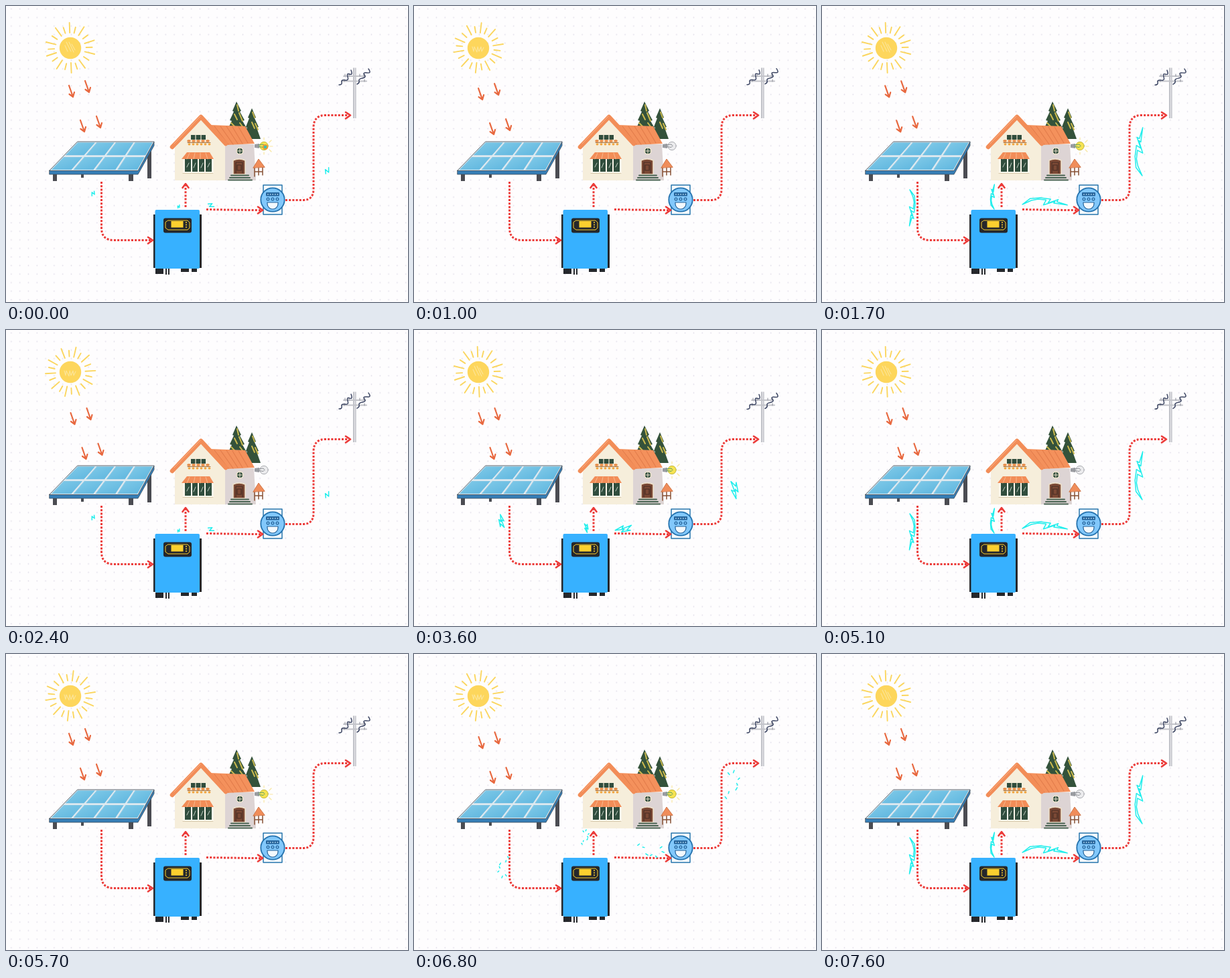
Write an HTML page that moves like this. It is 600x443 px and loops after 7.7 s.

```html
<!DOCTYPE html>
<html lang="en">
<head>
<meta charset="utf-8">
<title>Solar power flow</title>
<style>
html, body { margin: 0; width: 100%; height: 100%; overflow: hidden; background: #fefdfe; }
svg { display: block; width: 600px; height: 443px; fill: none; stroke-linecap: round; stroke-linejoin: round; }
.dots { stroke: #ec3b39; stroke-width: 3; stroke-linecap: butt; stroke-dasharray: 3 2.2; }
.tip { stroke: #ec3b39; stroke-width: 2.6; }
</style>
</head>
<body>
<svg viewBox="0 0 600 443">
  <defs>
    <pattern id="grid" width="12.8" height="12.8" patternUnits="userSpaceOnUse" x="1.5" y="-2">
      <circle cx="6.4" cy="6.4" r="0.9" fill="#e0dde8"/>
    </pattern>
    <linearGradient id="steel">
      <stop offset="0" stop-color="#a9abb3"/><stop offset=".5" stop-color="#e3e3e7"/><stop offset="1" stop-color="#b4b5bd"/>
    </linearGradient>
    <linearGradient id="glass" x2="1" y2="1">
      <stop offset="0" stop-color="#82cbe9"/><stop offset="1" stop-color="#5db5de"/>
    </linearGradient>
  </defs>
  <path fill="url(#grid)" d="M0 0H600V443H0z"/>

  <g transform="translate(96 63)">
    <circle r="16.2" fill="#fdd65c"/>
    <path id="scribble" stroke="#fce59a" stroke-width="1.1"/>
    <path id="rays" stroke="#fbd65f" stroke-width="1.9"/>
  </g>
  <path id="beams" stroke="#e8683f" stroke-width="2.2"/>

  <!-- solar panel -->
  <path fill="#4b4c52" d="M70 250h6v12h-6zM112 250h4v7h-4zM183 247h7v15h-7zM211 215h6v43h-6z"/>
  <path fill="#357db5" stroke="#42505c" stroke-width=".8" d="M65 246H197L221 203V209L197 252H65z"/>
  <path fill="#dfeaf0" stroke="#4d5962" stroke-width=".9" d="M107 203H221L197 246.500H65z"/>
  <g id="cells" fill="url(#glass)" stroke="#5cb3da" stroke-width=".5"></g>

  <!-- house -->
  <g fill="#34523b">
    <path d="M344 143l7 14-2 1 7 13-3 1 8 14-3 1 4 13H327l5-13-2-1 7-14-3-1 6-13-2-1z"/>
    <path d="M367 153l6 14-2 1 6 13-3 1 6 17H354l6-17-2-1 5-13-2-1z"/>
  </g>
  <path stroke="#c9b84e" stroke-width="2" d="M345 148l2 9M341 162l4 8M348 160l5 12M336 175l5 5M349 175l6 8M368 159l3 8M367 174l4 9M372 176l4 9"/>
  <path fill="#f6eedb" d="M252 261V208L291 169 328 208V261z"/>
  <path fill="#ddd4d4" d="M327 207H370L373 261H327z"/>
  <path fill="#f4915c" d="M304 178L357 180 371 206 329 208z"/>
  <path stroke="#e27c4b" stroke-width="1.1" d="M311 180l21 27M320 180l19 27M329 180l17 26M338 181l15 25M347 181l14 24"/>
  <path stroke="#f28d58" stroke-width="6.5" d="M248 211L291 166 328 206"/>
  <path stroke="#f9b28a" stroke-width="1" d="M251 206L290 165"/>
  <path fill="#304d3d" d="M276 193h22v7h-22z"/>
  <path stroke="#f3ead2" stroke-width="1.200" d="M283 193v7M291 193v7"/>
  <path stroke="#e68a45" stroke-width="3.500" stroke-dasharray="2 5" d="M272 202H306"/>
  <path stroke="#f1a53f" stroke-width="2.800" stroke-dasharray="1 5" d="M273 207H305"/>
  <path stroke="#a17143" stroke-width="1" d="M271 204.500H305"/>
  <path fill="#fbf6ea" d="M264 228h46v23h-46z"/>
  <path fill="#304d3d" d="M267 229h9v19h-9zM278 229h8v19h-8zM288 229h8v19h-8zM298 229h9v19h-9z"/>
  <path stroke="#c3cfc3" stroke-width="1" d="M270 241l3-6M280 242l3-7M291 242l3-7M301 241l3-6"/>
  <path stroke="#d7c8aa" stroke-width="1.200" d="M264 250.500H309"/>
  <path fill="#f28d58" d="M270 219h34l6 10h-48z"/>
  <path stroke="#f8b98d" stroke-width="1" d="M274 220l-4 9M282 220l-2 9M290 220v9M298 220l3 9"/>
  <circle cx="349" cy="217" r="5" fill="#304d3d" stroke="#efe4cf" stroke-width="1.400"/>
  <path stroke="#efe4cf" d="M349 212v10M344 217h10"/>
  <path fill="#7b4935" stroke="#f0e2cb" stroke-width="1.500" d="M339 252V231q9-4 18 0V252z"/>
  <path stroke="#492d24" stroke-width="1.200" d="M343 250V234h10v16M345 238h6v8h-6z"/>
  <path stroke="#496352" stroke-width="2" d="M336 253.500H362M334 257H364M332 260.500H367"/>
  <path stroke="#875035" stroke-width="1.500" d="M371 241V255M383 241V253M371 248H383M377 242V253"/>
  <path fill="#f08d5a" stroke="#cf7548" d="M369 242l8-13 9 12z"/>

  <g>
    <path id="glow" stroke="#f9e6a0" stroke-width="1.200" d="M385 200v-3M393 204l3-3M394 210h4M393 215l3 3M385 219v3"/>
    <path fill="#9a9ca1" d="M371 207l7-1v7l-7-1z"/>
    <circle id="globe" cx="385" cy="209.500" r="6.200"/>
    <path id="filament" stroke-width="1" d="M377 208l7-1 2 2.500-2 2-7-1"/>
    <circle id="flare" cx="387" cy="211" r="3.200" fill="#39c3b2" stroke="#ef9a36" stroke-width="1.800"/>
  </g>

  <!-- inverter -->
  <path fill="#25272b" d="M220 312h72v80h-72zM223 393h12v8h-12zM238 393h2v9h-2zM242 393h2v9h-2zM261 392h12v6h-12zM277 392h8v6h-8z"/>
  <rect x="222.500" y="305" width="66.500" height="88" rx="2" fill="#37b1ff"/>
  <rect x="235" y="317.500" width="42" height="22" rx="3" fill="#25272b"/>
  <path stroke="#f8cc2c" d="M242 321H271l3 3v8l-3 3H242l-4-3v-8z"/>
  <path fill="#fbd02f" d="M246.500 322h18v9.500h-18z"/>
  <path stroke="#fbd02f" stroke-width="2" stroke-dasharray="0 3.500" d="M269 324V332"/>

  <!-- meter -->
  <path fill="#f5fafd" stroke="#2776ad" stroke-width="1.500" d="M384 268h28v44h-28z"/>
  <circle cx="398" cy="290" r="17.700" fill="#82c8fb" stroke="#2472ae" stroke-width="1.800"/>
  <rect x="388" y="279" width="20" height="5.500" rx="1" fill="#25639a"/>
  <path stroke="#c8e8fc" stroke-width="1.800" stroke-dasharray="0 3.600" d="M391 281.800H407"/>
  <g stroke="#25639a" stroke-width="1.200">
    <circle cx="391" cy="289" r="1.900"/><circle cx="398" cy="289" r="1.900"/><circle cx="405" cy="289" r="1.900"/>
    <path fill="#f3f9fd" d="M390 294H406v2a8 8 0 0 1-16 0z"/>
  </g>

  <!-- utility pole -->
  <path fill="url(#steel)" d="M518 92.500h4.500V168H518z"/>
  <path stroke="#c3c4ca" stroke-width="2.200" d="M504 105H536M502 112.500H538"/>
  <path stroke="#9a9ca4" stroke-width="1.200" d="M506 102v3M512 102v3M528 102v3M534 102v3M505 110v3M535 110v3"/>
  <path id="wires" stroke="#3d4663" stroke-width="1.500" d="M497 118q5 0 4-4t5-3 4-5 3-4 2-6M524 117q4-2 3-5t5-4 3-5 4-3 2-6"/>

  <!-- connections -->
  <path class="dots" d="M142.500 263V332Q142.500 350.500 161 350.500H218M268 301V268M299 304.500L381 305.700M417 290.500H443Q459 290.500 459 274V182Q459 163.500 477 163.500H511"/>
  <path class="tip" d="M212 346l7 4.500-7 5M263.500 272l4.500-6 4.500 6M376 300.500l7 5-7 5M507 159l7 4.500-7 5"/>
  <g id="bolts" stroke="#22eeec"></g>
</svg>
<script>
const el = id => document.getElementById(id);
const show = (id, on) => el(id).setAttribute('visibility', on ? 'visible' : 'hidden');
const set = (id, attrs) => { for (const k in attrs) el(id).setAttribute(k, attrs[k]); };

// Panel cells, interpolated between the top and bottom edges
const corner = (u, v) => [107 - 42 * v + u * (114 + 18 * v), 203 + 43.5 * v].join();
let cells = '';
for (let r = 0; r < 2; r++) for (let c = 0; c < 4; c++) {
  const [a, b, p, q] = [c / 4 + .015, (c + 1) / 4 - .015, r / 2 + .04, r / 2 + .46];
  cells += `<path d="M${corner(a, p)}L${corner(b, p)} ${corner(b, q)} ${corner(a, q)}z"/>`;
}
el('cells').innerHTML = cells;

// Bolt stages in a unit frame: x runs along the connection
const stages = {
  small: 'M.04 -.01L.13 -.02.07 .05.17 .05',
  medium: 'M.02 .04L.2 -.06.17 .01.38 -.07.28 .03.36 .04.16 .08.22 .02z',
  large: 'M0 0L.17 -.13.4 -.15.63 -.12.57 -.03.8 -.11.77 -.06 1 .01.7 -.03.73 -.07.47 .01.53 -.1.35 -.12.2 -.09z',
  shards: 'M.52 -.16l.04 -.03M.7 .03l.05 .03M.8 .07l.04 -.02M.92 .08l.03 .03M1.02 -.1l.04 -.03M1.06 -.02l.05 .02M.63 -.12l.04 .01'
};
// x, y, length, angle
const bolts = [[131, 275, 54, 90], [257, 304, 37, -90], [299, 297, 67, 0], [478, 254, 72, -90]];
for (const name in stages) {
  el('bolts').innerHTML += `<g id="${name}">` + bolts.map(([x, y, len, turn]) =>
    `<path transform="translate(${x} ${y}) rotate(${turn}) scale(${len})" d="${stages[name]}"
      stroke-width="${1.5 / len}"/>`).join('') + '</g>';
}

function rays(turn, reach) {
  let d = '';
  for (let i = 0; i < 20; i++) {
    const a = (i * 18 - 92 + turn + 2 * Math.sin(i * 5)) * Math.PI / 180;
    const start = 23 + Math.sin(i * 3);
    const end = start + reach * (i % 2 ? 9 : 15);
    d += `M${Math.cos(a) * start} ${Math.sin(a) * start}L${Math.cos(a) * end} ${Math.sin(a) * end}`;
  }
  return d;
}

function drawSun(t) {
  const p = t % 1800;
  const wide = p >= 200 && p < 700 || p >= 850 && p < 1400;
  const turn = !wide ? 0 : p >= 450 && p < 700 ? 15 : 9;
  const reach = p >= 850 && p < 950 ? (p - 800) / 150 : 1;
  show('rays', p < 700 || p >= 850);
  set('rays', { d: rays(turn, reach) });
  set('scribble', { d: wide
    ? 'M-9 -2l2 7 1 -7 4 8 1 -8 2 7 3 -7 1 7 3 -6'
    : 'M-8 -4l4 9M-6 -9l7 14M-2 -9l7 15M2 -6l5 9' });
}

function drawBeams(t) {
  const s = Math.min(1, Math.max(0, .5 - .9 * Math.cos(t / 1450 * 2 * Math.PI)));
  const beam = ([x, y]) => `M${x + 2.5 * s} ${y + 5 * s}l6 17m-5.5 -4l5.500 4 2 -7`;
  set('beams', { d: [[94, 119], [118, 112], [111, 171], [135, 165]].map(beam).join('') });
}

function drawBulb(t) {
  const p = t % 2200, on = p < 100 || p >= 1200;
  show('glow', on);
  show('flare', t < 100);
  set('globe', { fill: on ? '#f6e352' : '#ececee', stroke: on ? '#c3b83d' : '#a9abb0' });
  set('filament', { stroke: on ? '#5b9e68' : '#8d8f95' });
}

function drawBolts(t) {
  const p = t % 1180;
  const stage = p < 45 ? 'small' : p < 150 ? 'medium' : p < 600 ? 'large' : p < 900 ? 'shards' : '';
  for (const name in stages) show(name, name == stage);
}

const begin = performance.now();
function frame() {
  const clock = Math.floor((performance.now() - begin) % 7700 / 100) * 100;
  // Short hold before the closing part
  const t = clock < 6200 ? clock : Math.max(6200, clock - 300);
  drawSun(t);
  drawBeams(t);
  drawBulb(t);
  drawBolts(t);
  set('wires', { transform: `translate(0 ${t < 5700 ? Math.sin(t / 260) / 2 : 0})` });
  requestAnimationFrame(frame);
}
frame();
</script>
</body>
</html>
```
